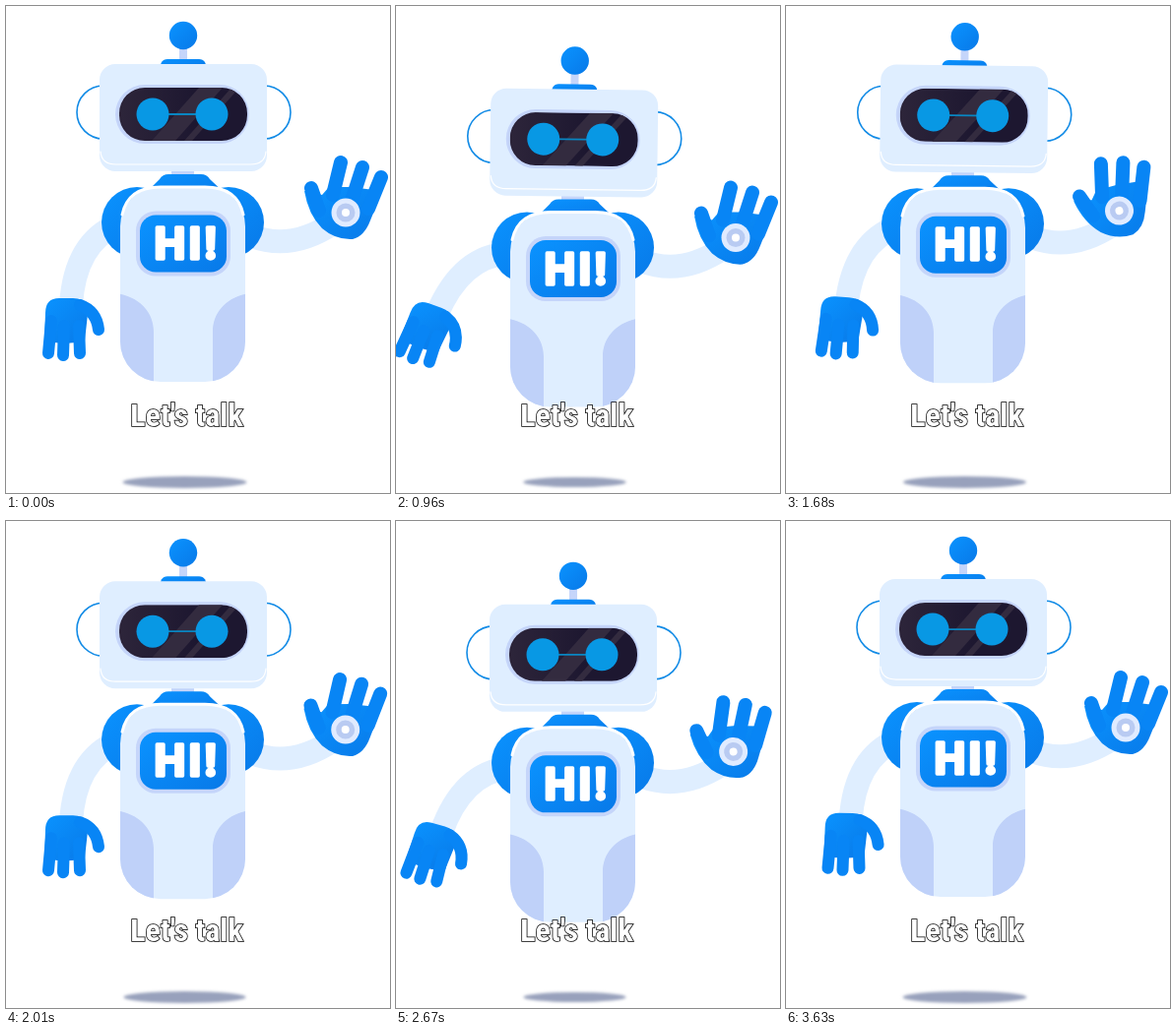
Animation of 390x495 px, one loop 3660 ms. Source, as an HTML page:

```html
<!DOCTYPE html>
<html lang="en">
<head>
<meta charset="utf-8">
<title>Waving robot</title>
<style>
  html, body { margin: 0; width: 100%; height: 100%; overflow: hidden; background: #fff; }
  svg { display: block; width: 390px; height: 495px; }
  .round { fill: none; stroke-linecap: round; }
  .limb { stroke: #dfeeff; stroke-width: 24; }
  .blue { fill: url(#blue); }
  .pale { fill: #dfeeff; }
  .trim { fill: #c5d5fa; }
  .caption { font: 900 32px Impact, "Roboto Condensed", Roboto, sans-serif; font-stretch: 75%;
    fill: #fff; stroke: #000; stroke-width: 1.5; paint-order: stroke; }
  .hi { font: 700 45px Roboto, sans-serif; letter-spacing: 3px;
    fill: #fff; stroke: #fff; stroke-width: 3.5; stroke-linejoin: round; }
</style>
</head>
<body>
<svg viewBox="0 0 390 495">
  <defs>
    <linearGradient id="blue" x1="0" y1="0" x2="1" y2="1">
      <stop offset="0" stop-color="#0a93ff"/><stop offset="1" stop-color="#0879e8"/>
    </linearGradient>
    <linearGradient id="glass">
      <stop offset="0" stop-color="#2d253a"/><stop offset=".6" stop-color="#1d1730"/>
    </linearGradient>
    <filter id="soft" x="-10%" y="-60%" width="120%" height="220%"><feGaussianBlur stdDeviation="1.6"/></filter>
    <clipPath id="torso"><rect x="116" y="184" width="127" height="198" rx="41"/></clipPath>
    <clipPath id="visor"><rect x="115" y="83" width="130" height="54" rx="26"/></clipPath>
  </defs>

  <ellipse id="shadow" cx="181.5" cy="484" fill="#98a1bc" filter="url(#soft)"/>

  <g id="robot">
    <g id="leftArm">
      <path class="round limb" d="M114 222Q70 240 66 304"/>
      <path class="blue" d="M40 312Q40 297 54 297H68Q78 297 84 304L80 340Q60 346 39 340Z"/>
      <g class="round" stroke="#0885f5" stroke-width="12">
        <path d="M75 304Q92 310 94 329M46 320L43 353M59 325L58 355M74 325L75 353"/>
      </g>
    </g>

    <path class="round limb" d="M250 234Q290 249 332 221"/>
    <g id="rightHand">
      <path class="blue" d="M303 188Q307 212 321 226Q335 238 352 237Q364 234 370 218L382 188L350 184L328 184L321 192Z"/>
      <g class="round" stroke="#0885f5" stroke-width="14">
        <path d="M310 185L318 208M340 159L332 192M362 164L352 195M381 174L368 206"/>
      </g>
      <circle cx="345" cy="210" r="14.5" fill="#e0ebff"/>
      <circle cx="345" cy="210" r="9.5" fill="#b9cbf2"/>
      <circle cx="345" cy="210" r="4" fill="#fff"/>
    </g>

    <rect class="trim" x="168" y="163" width="23" height="14"/>
    <path class="blue" d="M140 192L156 176Q159 171 165 171H198Q204 171 207 176L224 192Z"/>
    <circle class="blue" cx="133" cy="220" r="36"/>
    <circle class="blue" cx="226" cy="220" r="36"/>
    <rect class="pale" x="116" y="183" width="127" height="199" rx="41"/>
    <path class="round" stroke="#fff" stroke-width="3" d="M118 212Q124 184 157 184H202Q235 184 241 212"/>
    <g clip-path="url(#torso)" fill="#bfd1f9">
      <path d="M115 292.500C137 297 150 312 150 331V383H115ZM244 292.500C223 297 210 312 210 331V383H244Z"/>
    </g>
    <rect class="trim" x="132" y="208.500" width="96" height="66" rx="20"/>
    <rect class="blue" x="136" y="212.500" width="88" height="58" rx="16"/>
    <text class="hi" x="150.500" y="257">HI!</text>

    <g id="head">
      <g fill="none" stroke="#128be6" stroke-width="1.6">
        <circle cx="99" cy="108" r="27"/><circle cx="262" cy="108" r="27"/>
      </g>
      <rect class="trim" x="176" y="40" width="8" height="18"/>
      <path class="blue" d="M156 62L158 57Q160 54 164 54H196Q200 54 202 57L204 62Z"/>
      <circle class="blue" cx="180" cy="30" r="14.200"/>
      <rect class="pale" x="95" y="59" width="170" height="109" rx="16"/>
      <path class="round" stroke="#fff" stroke-width="1.2" d="M96 148Q97 161 112 161H248Q263 161 264 148"/>
      <rect class="trim" x="111" y="80" width="136" height="60" rx="30"/>
      <g clip-path="url(#visor)">
        <rect x="115" y="83" width="130" height="54" fill="url(#glass)"/>
        <path fill="#332b3f" d="M196 83H220L172 137H148ZM229 83H237L189 137H181Z"/>
      </g>
      <path stroke="#0886c2" stroke-width="1.8" d="M149 110H209"/>
      <circle cx="149" cy="110" r="16.500" fill="#0898e4"/>
      <circle cx="209" cy="110" r="16.500" fill="#0898e4"/>
    </g>
  </g>

  <text class="caption" x="183.500" y="426.500" text-anchor="middle">Let's talk</text>
</svg>
<script>
const LOOP = 3660, CYCLE = LOOP / 2, LOWEST = 885;
const part = id => document.getElementById(id);
const [shadow, robot, leftArm, rightHand, head] =
  ["shadow", "robot", "leftArm", "rightHand", "head"].map(part);
const clamp = p => Math.min(1, Math.max(0, p));
const ease = p => (1 - Math.cos(Math.PI * clamp(p))) / 2;
const rotate = (el, angle, x, y) => el.setAttribute("transform", `rotate(${angle} ${x} ${y})`);

function bodySink(t) {
  return ease(t < LOWEST ? t / LOWEST : (CYCLE - t) / (CYCLE - LOWEST)) ** 1.07;
}

function armSwing(t) {
  return t < 1020 ? ease((t - 430) / 590) : 1 - clamp((t - 1020) / 790);
}

function headTilt(t) {
  if (t < 450) return -8.5 * ease(t / 450);
  if (t < 1420) return -8.5 + 17 * ease((t - 450) / 970);
  return 8.5 * (1 - ease((t - 1420) / 320));
}

// Two waves, each leaning left and coming back.
function handWave(t) {
  const wave = (t - 1295) / 769;
  return wave > 0 && wave < 2 ? -15.7 * Math.sin(Math.PI * wave) ** 2 : 0;
}

function draw(now) {
  const t = now % LOOP, c = t % CYCLE, sink = bodySink(c);
  robot.setAttribute("transform", `translate(0 ${26 * sink})`);
  rotate(leftArm, 20 * armSwing(c), 103, 225);
  rotate(rightHand, handWave(t), 330, 232);
  rotate(head, headTilt(t), 180, 170);
  shadow.setAttribute("rx", 63 - 11 * sink);
  shadow.setAttribute("ry", 6 - sink);
  requestAnimationFrame(draw);
}
requestAnimationFrame(draw);
</script>
</body>
</html>
```
